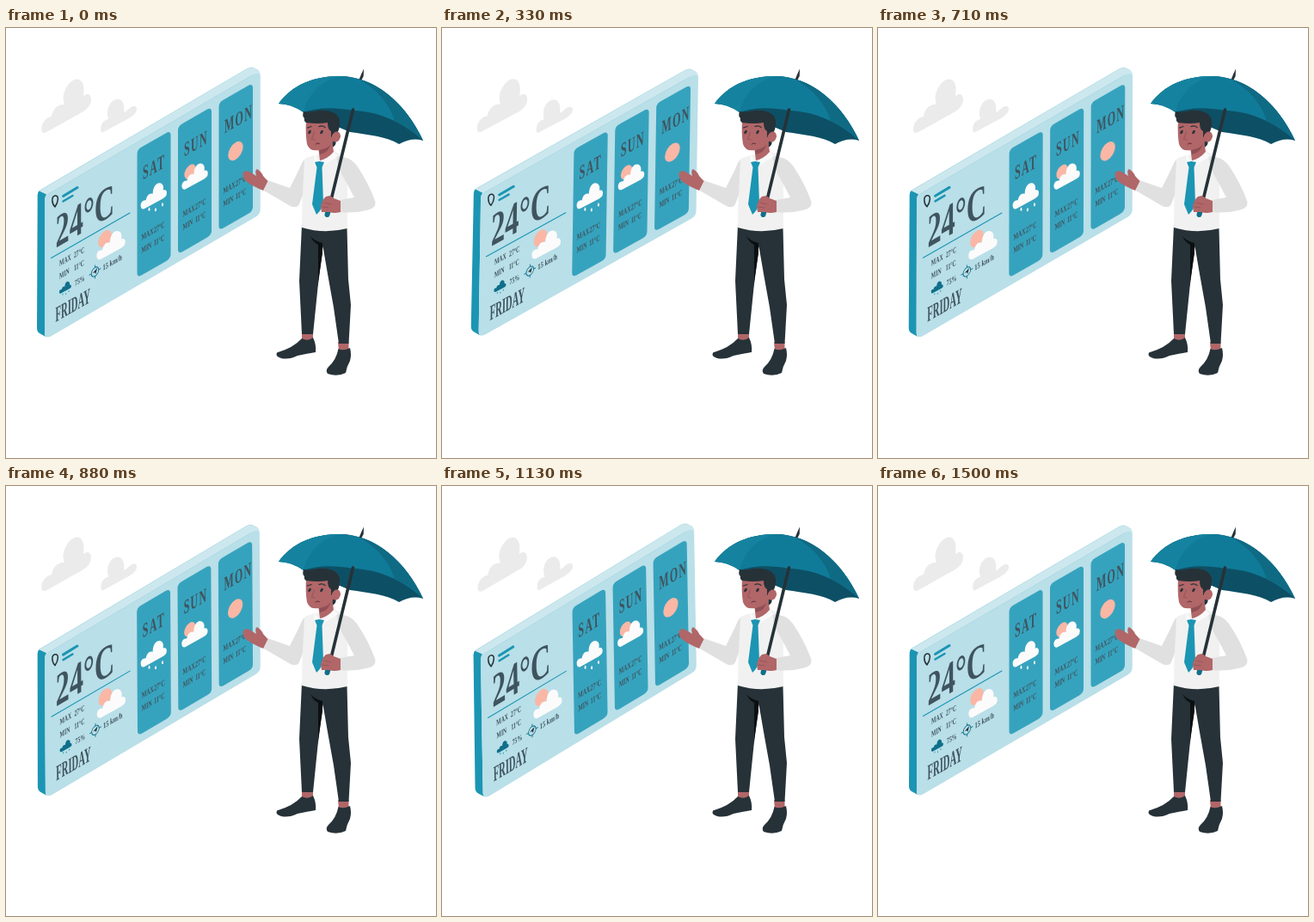
Write an HTML page with a canvas that moves like this. It is 500 by 500 pixels and loops after 1.54 s.

```html
<!DOCTYPE html>
<html lang="en">
<head>
<meta charset="utf-8">
<title>Weather board</title>
<style>
html, body { margin: 0; width: 100%; height: 100%; overflow: hidden; background: #fff; }
canvas { display: block; width: 100vw; height: 100vh; }
</style>
</head>
<body>
<canvas id="stage" width="500" height="500"></canvas>
<script>
const ctx = document.getElementById('stage').getContext('2d');
const LOOP = 1540;
const SWAY = 1500;
const SLOPE = 0.577;
const C = {
  teal: '#1b95b3', deep: '#0f6f8a', face: '#b9dfe8', rim: '#cce8ee', panel: '#36a3be',
  ink: '#263238', text: '#3f545e', sun: '#fab7a5', skin: '#b16668', shirt: '#f1f1f1',
  sleeve: '#e0e0e0', cloud: '#fbfbfb', grey: '#ebebeb'
};
const CLOUD = 'M0 28C-.5 23 2 20.500 6 20.500C7 15 10 12 14 13C14 5 18 0 22 .5C26 1 27 5 26 9C29 7.500 31 10 30 13.500C30 15.500 28 17 26 18.500L4 30.500Q.5 31.500 0 28Z';

function shape(d, color) {
  ctx.fillStyle = color;
  ctx.fill(new Path2D(d));
}

function line(d, color, width) {
  ctx.strokeStyle = color;
  ctx.lineWidth = width;
  ctx.lineCap = 'round';
  ctx.lineJoin = 'round';
  ctx.stroke(new Path2D(d));
}

function cloud(x, y, scale, color = C.cloud) {
  ctx.save();
  ctx.translate(x, y);
  ctx.scale(scale, scale);
  shape(CLOUD, color);
  ctx.restore();
}

function isoDisc(x, y, r, color) {
  ctx.save();
  ctx.transform(0.866, -0.5, 0, 1, x, y);
  ctx.fillStyle = color;
  ctx.beginPath();
  ctx.arc(0, 0, r, 0, Math.PI * 2);
  ctx.fill();
  ctx.restore();
}

// Condensed serif lettering lying in the plane of the board.
function label(text, x, y, size, condense = 0.59, spacing = 0) {
  ctx.save();
  ctx.transform(condense, -SLOPE * condense, 0, 1, x, y);
  ctx.font = `bold ${size}px "Liberation Serif", serif`;
  ctx.letterSpacing = `${spacing}px`;
  ctx.fillStyle = C.text;
  ctx.fillText(text, 0, 0);
  ctx.restore();
}

function drop(x, y, r, color) {
  shape(`M${x} ${y - 2.3 * r}Q${x + 1.5 * r} ${y} ${x} ${y + r}Q${x - 1.6 * r} ${y + r / 2} ${x} ${y - 2.3 * r}Z`, color);
}

function panel(x, width) {
  ctx.save();
  ctx.transform(1, -SLOPE, 0, 1, x, 141.5 - (x - 152.5) * SLOPE);
  ctx.beginPath();
  ctx.roundRect(0, 0, width, 149, 5);
  ctx.fillStyle = C.panel;
  ctx.fill();
  ctx.restore();
}

function forecast(day, x, y) {
  label(day, x + 1.5, y - 70.5, 23, 0.52, 2.5);
  label('MAX', x, y, 10);
  label('27°C', x + 14.5, y - 8.5, 10);
  label('MIN', x, y + 15, 10, 0.57);
  label('11°C', x + 14.5, y + 6.5, 10);
}

function today() {
  line('M57 208C53 204 52.500 196 57 195C62 194.500 61 202 57 208Z', C.ink, 1.5);
  line('M66.500 195.500L83 185.500', C.teal, 3);
  line('M66.500 201.500L77.500 195', C.teal, 2.5);
  label('24°C', 57.5, 256, 54, 0.6);
  line('M52.500 267.500L144 215', C.teal, 1.1);
  label('MAX', 62, 277, 9.7);
  label('27°C', 79, 267.5, 9.7);
  label('MIN', 62, 292, 9.7);
  label('11°C', 79, 282.5, 9.7);
  isoDisc(115, 245, 9, C.sun);
  cloud(105.5, 235.5, 1.1);
  cloud(62, 294.5, 0.46, C.deep);
  for (const [x, y] of [[66, 310], [69.5, 309.5], [73, 306.5]]) drop(x, y, 0.8, C.teal);
  label('75%', 80, 300, 9.5, 0.61);
  ctx.save();
  ctx.transform(0.866, -0.5, 0, 1, 103.5, 283.5);
  ctx.beginPath();
  ctx.arc(0, 0, 5, 0, Math.PI * 2);
  ctx.strokeStyle = C.deep;
  ctx.lineWidth = 1;
  ctx.stroke();
  line('M-7.500 0H-5M5 0H7.500M0 -7.500V-5M0 5V7.500', C.deep, 1);
  shape('M3 -3L1 3L-.2 .6L-3 0Z', C.ink);
  ctx.restore();
  label('15 km/h', 112.5, 282, 9.5, 0.68);
  label('FRIDAY', 57.5, 342, 25, 0.425);
}

function board() {
  shape('M36.500 196Q36.500 190 41 187.500L280 47.500Q285 44.800 288 46.500L293.500 49.500Q296 51 296 56L290 80L52 352Z', C.rim);
  shape('M36.700 196Q36.700 191 38.500 189.500L47 193.500Q45 196 45 200L45 355Q45 359 48 360L39 355Q36 353 36 349Z', C.teal);
  shape('M45 200Q45 195.500 49 193L286 55Q295 49.500 295.700 58L295.700 211Q295.500 216.500 290.500 219.500L53 358Q45 362.500 45 354Z', C.face);
  line('M38.500 189.500L280 47.500Q285 45 288 46.500L293.500 49.500M49 193L286 55', '#9fd1dd', 0.5);
  panel(152.5, 39);
  panel(200, 39);
  panel(247.5, 39.5);
  today();

  forecast('SAT', 157.5, 247);
  cloud(156.700, 179.7, 1);
  for (const [x, y] of [[166.5, 211.5], [174, 212], [182, 206]]) drop(x, y, 1.4, C.cloud);

  forecast('SUN', 205.5, 220);
  isoDisc(214, 167, 7.7, C.sun);
  cloud(204.5, 157, 1);

  forecast('MON', 252.5, 193);
  isoDisc(267, 143, 10, C.sun);
}

function skyClouds() {
  shape('M42 121C39 114 45 104 53 103C54 95 60 88 68 89C65 81 67 74 71 68C75 61 82 57 87 61C91 65 91 72 90 79C95 75 99 77 99 83C99 89 95 94 90 97L48 120.500Q44 123 42 121Z', C.grey);
  shape('M110.500 120.500C109 113 113 107 119 106C117 98 118 91 123 86C128 81 134 82 136 87C138 91 137 95 137.500 98C141 97 143 92 148 91C152 90 153 94 151 98C149 101 146 103 143 105L115 120Q112 122.500 110.500 120.500Z', C.grey);
}

function umbrella() {
  shape('M416 47.500L415.700 56L412.500 62L410 61.500L413 54Z', C.ink);
  shape('M317 88C333 66 358 56 388 56C428 56 465 87 485 131C476 128 466 130 457 135C443 126 420 124 400 121L346 98Q331 87 317 88Z', '#0d5065');
  shape('M317 88C333 66 358 56 388 56C428 56 465 87 485 131C464 111 435 97 404 96C382 92 362 92 346 98Q331 88 317 88Z', '#107b99');
  shape('M317 88C333 66 358 56 388 56C363 62 350 80 346 98Q331 88 317 88Z', '#1583a0');
  shape('M411 60C440 66 470 98 485 131C475 121 464 114 452 108C446 88 430 70 411 60Z', '#0f6a84');
}

function legs() {
  shape('M344 354H357V364Q350 368 344 363Z', C.skin);
  shape('M386 365H398.500V375Q392 379 387 376Z', C.skin);
  shape('M344 361Q351 365 357 360Q361 368 360 377Q348 379 339 381Q329 386 320 384Q313 382 315 377.500Q334 372 344 361Z', C.ink);
  shape('M386.500 373Q392 376 400 372Q402 380 400 387Q396 394 395 401Q385 406 374 402Q371 398 375 394Q384 386 386.500 373Z', C.ink);
  shape('M344 229Q370 240 396.500 232L398 292L401 322L398.500 367H387L381 325L374 286L368.500 254L362.500 302L357 356H344L341 294Z', C.ink);
  shape('M354 242Q359 248 368 250L368 262L363 295L363 252Q357 249 354 242Z', '#0b0f11');
}

function body() {
  shape('M349 151Q361 147 382 144Q396 148 397 163V233Q370 240 344 232L345 164Q344 154 349 151Z', C.shirt);
  shape('M347 153Q344 156 341 164L330 186L304 177L298 188L329 206Q337 211 341 205L345 194Z', C.sleeve);
  shape('M276 168Q278 165 283 167L291 172Q289 165 292 164Q297 167 299 172L304.500 178L299 189Q287 184 280 179Q274 174 276 168Z', C.skin);
  shape('M384 149Q400 149 408 160Q422 181 429.500 202Q430 210 421 211.500Q405 216 388 214L388.500 200L405 197L396 180Q386 165 384 149Z', C.sleeve);
  shape('M359 147L365 157L381 144L386 149L369 160L364 157L358 160Z', '#fafafa');
  shape('M359 156L364 155L370 156L367.500 162L369 203Q367 212 361 217L356 205L361.500 162Z', C.teal);
}

function head() {
  shape('M363 138L379 130L381 144Q374 152 365 154Z', C.skin);
  shape('M364 142Q373 140 378 133Q376 145 365 147Z', '#8f4f55');
  shape('M379 130L383 130Q385 136 380 138.500Z', C.ink);
  shape('M349 107L382 106L382 128Q378 140 364 142Q353 144 350 135Q348 123 349 107Z', C.skin);
  shape('M349 110Q346 108 347 105Q344 102 346 97Q352 98 357 97Q370 94 380 98Q389 102 388 111Q388 118 385 122L378 127L378 120Q374 118 374 110Q363 112 349 110Z', C.ink);
  shape('M379 125Q382 119 387 121Q391 125 387 131Q383 134 379 131Z', C.skin);
  line('M350.500 116L355 114.500M364 114.500Q368 113 371 115.500', C.ink, 1.3);
  for (const x of [353, 367]) isoDisc(x, 121, 2, C.ink);
  line('M358.500 121L355.500 129L359 130', '#8f4f55', 0.8);
  line('M360 135Q362 133 364.500 134.500', '#5d2f38', 1);
}

function pole() {
  line('M403.500 95L377 204', C.ink, 3.6);
  line('M376 207L373.500 217', C.deep, 6);
  shape('M366 208Q367 200 372 196L377 195L381 198L389 201V214Q382 216 375 214L367 214Z', C.skin);
  line('M368 208L375 209M370 203L378 205', '#8f4f55', 0.7);
}

function swayed(x, y, angle, draw) {
  ctx.save();
  ctx.translate(x, y);
  ctx.rotate(angle);
  ctx.translate(-x, -y);
  draw();
  ctx.restore();
}

// Linear sway: 0 → 1° → −1° → 0, then a short rest until the loop ends.
function swayAngle(time) {
  const phase = Math.min((time % LOOP) / SWAY, 1);
  const wave = phase < 0.25 ? 4 * phase : phase < 0.75 ? 2 - 4 * phase : 4 * phase - 4;
  return wave * Math.PI / 180;
}

let start;
function render(now) {
  start ??= now;
  const angle = swayAngle(now - start);
  ctx.fillStyle = '#fff';
  ctx.fillRect(0, 0, 500, 500);
  swayed(96, 90, angle, skyClouds);
  swayed(166, 203, angle, board);
  umbrella();
  legs();
  body();
  head();
  pole();
  requestAnimationFrame(render);
}
requestAnimationFrame(render);
</script>
</body>
</html>
```
